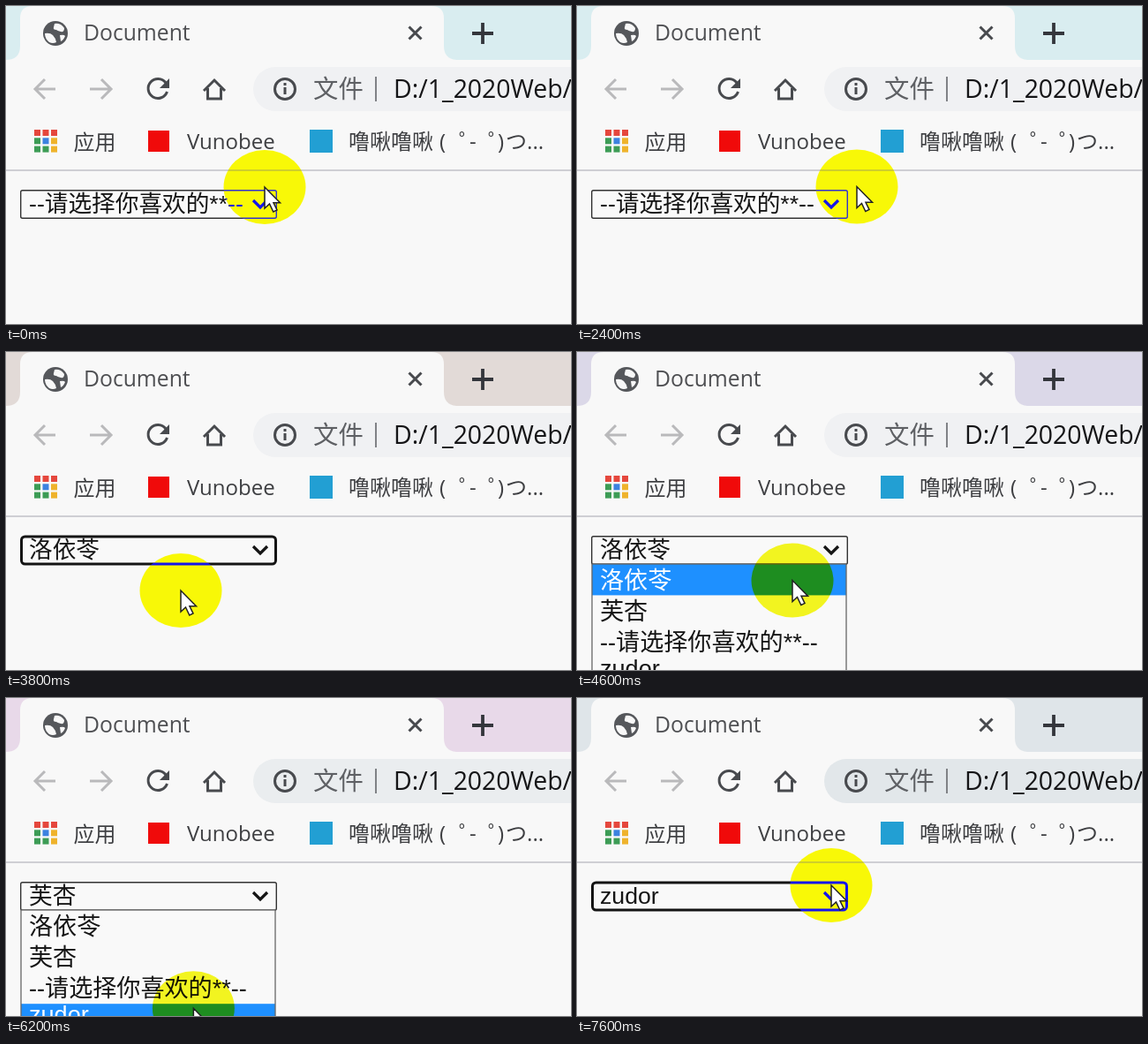
Animation, 640 px wide and 360 px high, one loop 8000 ms. Source, as an HTML page:

```html
<!DOCTYPE html>
<html lang="zh">
<head>
<meta charset="utf-8">
<title>Select menu</title>
<style>
  html, body { margin: 0; width: 100%; height: 100%; overflow: hidden; background: #f8f8f8; }
  svg { display: block; width: 100%; height: 100%; }
  text { white-space: pre; }
  .ui { font-family: 'Open Sans', 'Noto Sans CJK SC', 'Noto Sans CJK', sans-serif; }
  .form { font: 26.67px 'Liberation Sans', 'Noto Sans CJK SC', 'Noto Sans CJK', sans-serif; }
  .line { fill: none; stroke: #484a4e; stroke-width: 3; }
  .pale { stroke: #b9b9bb; }
  .bold { stroke: #34363c; stroke-width: 3.8; }
  #menu { font-size: 27.1px; }
  #spot { fill: #00f; mix-blend-mode: difference; }
  #spot.open { fill: #f8fa20; mix-blend-mode: multiply; }
</style>
</head>
<body>
<svg viewBox="0 0 640 360" xmlns="http://www.w3.org/2000/svg">
  <rect width="640" height="360" fill="#f8f8f8"/>

  <rect id="strip" width="640" height="61"/>
  <path d="M0 61Q16 61 16 45V14Q16 0 30 0H482Q496 0 496 14V45Q496 61 512 61Z" fill="#f8f8f8"/>
  <circle cx="56" cy="31" r="14" fill="#55575b"/>
  <path d="M44 31Q50 30 53 33T57 41Q53 43 49 41Q44 37 44 31ZM55 20Q62 19 66 25Q66 30 62 29T57 27Q53 27 54 24ZM61 33Q66 32 67 34Q65 39 62 40Z" fill="#f8f8f8"/>
  <text class="ui" x="88" y="39" font-size="24.7" fill="#4e4f52">Document</text>
  <path class="line" d="M456.5 23.5l14 14m0-14l-14 14"/>
  <path class="line bold" d="M528 31h24m-12-12v24"/>

  <path class="line pale" d="M56 94H33m11-11L33 94l11 11"/>
  <path class="line pale" d="M95 94h24m-11-11l11 11-11 11"/>
  <path class="line" d="M181 87A11 11 0 1 0 182.5 97"/>
  <path d="M185 82v11h-11Z" fill="#484a4e"/>
  <path class="line" d="M224 96l12-12 12 12M228.5 93v12h15v-12"/>

  <path id="address" d="M650 69H305a25 25 0 0 0 0 50H650Z"/>
  <circle class="line" cx="316" cy="94" r="11.5"/>
  <path class="line" d="M316 92v8m0-13v3"/>
  <g class="ui" font-size="28.4">
    <text x="348" y="103.5" fill="#5e6064">文件</text>
    <path d="M419 80v28" stroke="#808286" stroke-width="2"/>
    <text x="439" y="104" fill="#151517">D:/1_2020Web/</text>
  </g>

  <g id="apps"></g>
  <g class="ui" font-size="24" fill="#3e3f42">
    <text x="76.5" y="162.5">应用</text>
    <rect x="161" y="141" width="24" height="24" fill="#f00a0a"/>
    <text x="205" y="162">Vunobee</text>
    <rect x="344" y="140" width="26" height="26" fill="#229fd3"/>
    <text x="388" y="162">噜啾噜啾</text>
    <text y="162"><tspan x="491">(</tspan><tspan x="513">゜</tspan><tspan x="525">-</tspan><tspan x="546">゜</tspan><tspan x="557">)</tspan><tspan x="566">つ</tspan><tspan x="590">...</tspan></text>
  </g>
  <path d="M0 186H640" stroke="#cfcfd4" stroke-width="2"/>

  <g class="form">
    <rect id="box" fill="#f9f9f9"/>
    <text id="value" x="26" y="232.5" fill="#151515"></text>
    <path d="M280 220l8 8 8-8" fill="none" stroke="#151515" stroke-width="3.2"/>
    <g id="menu"></g>
  </g>

  <ellipse id="spot" rx="46.5" ry="42"/>
  <path id="pointer" d="M0 0V24L5.5 19L9.8 28L14 26L10 17.8H17.5Z" fill="#fff" stroke="#222" stroke-width="1.5"/>
</svg>

<script>
const DURATION = 8000, STEP = 200;
const MENU_TOP = 240, ROW = 35.4;
const $ = id => document.getElementById(id);

const labels = ['洛依苓', '芙杏', '--请选择你喜欢的**--', 'zudor'];
const PLACEHOLDER = 2;
const rowAt = y => Math.floor((y - MENU_TOP) / ROW);

// Each visit opens the menu at the arrow and clicks a row at height y.
const visits = [
  { open: 2800, close: 3600, y: 270 },
  { open: 4200, close: 5000, y: 288 },
  { open: 5600, close: 6400, y: 374 }
];
const arrow = { x: 290, y: 229 }, rest = { x: 317, y: 204.5 };
const stops = [
  { at: 0, x: 293, y: 205 }, { at: 1200, x: 298, y: 205 },
  { at: 2000, ...rest }, { at: 2400, ...rest },
  ...visits.flatMap(({ open, close, y }) => [
    { at: open - STEP, ...arrow }, { at: open, ...arrow },
    { at: close, x: 198, y }, { at: close + STEP, x: 198, y }
  ]),
  { at: 7200, x: 288, y: 212 }
];

// The tab strip drifts through these, one every TINT_TIME.
const tints = ['#d9edf0', '#e2dad7', '#dbd8e8', '#e2dce9', '#e8d9e9', '#dfe5e9'];
const TINT_START = 3000, TINT_TIME = 800;

const clamp = (v, max = 1) => Math.min(max, Math.max(0, v));
const ease = k => k * k * (3 - 2 * k);
const mix = (a, b, k) => `color-mix(in srgb, ${b} ${k * 100}%, ${a})`;

function pointerAt(t) {
  const next = stops.findIndex(stop => stop.at > t);
  if (next < 0) return stops[stops.length - 1];
  const a = stops[next - 1], b = stops[next];
  const k = ease((t - a.at) / (b.at - a.at));
  return { x: a.x + (b.x - a.x) * k, y: a.y + (b.y - a.y) * k };
}

function stripColor(t) {
  const pos = clamp((t - TINT_START) / TINT_TIME, tints.length - 1);
  const i = Math.floor(pos);
  return mix(tints[i], tints[i + 1] || tints[i], pos - i);
}

function setAttrs(el, attrs) {
  for (const name in attrs) el.setAttribute(name, attrs[name]);
}

const red = '#e5473d', green = '#3c9c55', blue = '#3c82e0', yellow = '#efb32c';
$('apps').innerHTML = [red, red, red, green, blue, yellow, green, green, yellow]
  .map((color, i) => `<rect x="${32 + i % 3 * 9.5}" y="${140 + Math.floor(i / 3) * 9.3}" width="7" height="7" fill="${color}"/>`)
  .join('');

const panel = `x="17" y="${MENU_TOP}" width="288" height="${ROW * labels.length}"`;
$('menu').innerHTML = `<rect ${panel} fill="#f9f9f9"/>` +
  labels.map((label, i) => {
    const top = MENU_TOP + i * ROW;
    const baseline = top + (/^[a-z]/.test(label) ? 21.5 : 27.5);
    return `<rect class="row" x="17" y="${top}" width="288" height="${ROW}"/>
      <text class="item" x="26" y="${baseline}">${label}</text>`;
  }).join('') +
  `<rect ${panel} fill="none" stroke="#666" stroke-width="1.3"/>`;
const rows = document.querySelectorAll('.row');
const items = document.querySelectorAll('.item');

function render(now) {
  const t = Math.floor(now % DURATION / STEP) * STEP;
  const { x, y } = pointerAt(t);
  const last = visits.filter(visit => t >= visit.close).pop();
  const selected = last ? rowAt(last.y) : PLACEHOLDER;
  const isOpen = visits.some(visit => t >= visit.open && t < visit.close);

  $('strip').style.fill = stripColor(t);
  $('address').style.fill = mix('#f0f1f3', '#e2e7ea', clamp((t - 5400) / 2000));
  setAttrs($('box'), last && !isOpen
    ? { x: 17.5, y: 209, width: 288, height: 31, rx: 4, stroke: '#141414', 'stroke-width': 3 }
    : { x: 16.7, y: 208.7, width: 289.6, height: 31.6, rx: 2, stroke: '#333', 'stroke-width': 1.4 });
  $('value').textContent = labels[selected];

  $('menu').style.display = isOpen ? '' : 'none';
  const active = y < MENU_TOP ? selected : rowAt(y);
  labels.forEach((_, i) => {
    rows[i].setAttribute('fill', i === active ? '#1e90ff' : 'none');
    items[i].setAttribute('fill', i === active ? '#fff' : '#151515');
  });

  $('spot').classList.toggle('open', isOpen);
  for (const id of ['spot', 'pointer']) $(id).setAttribute('transform', `translate(${x} ${y})`);
}

const start = performance.now();
function tick() {
  render(performance.now() - start);
  requestAnimationFrame(tick);
}
tick();
</script>
</body>
</html>
```
